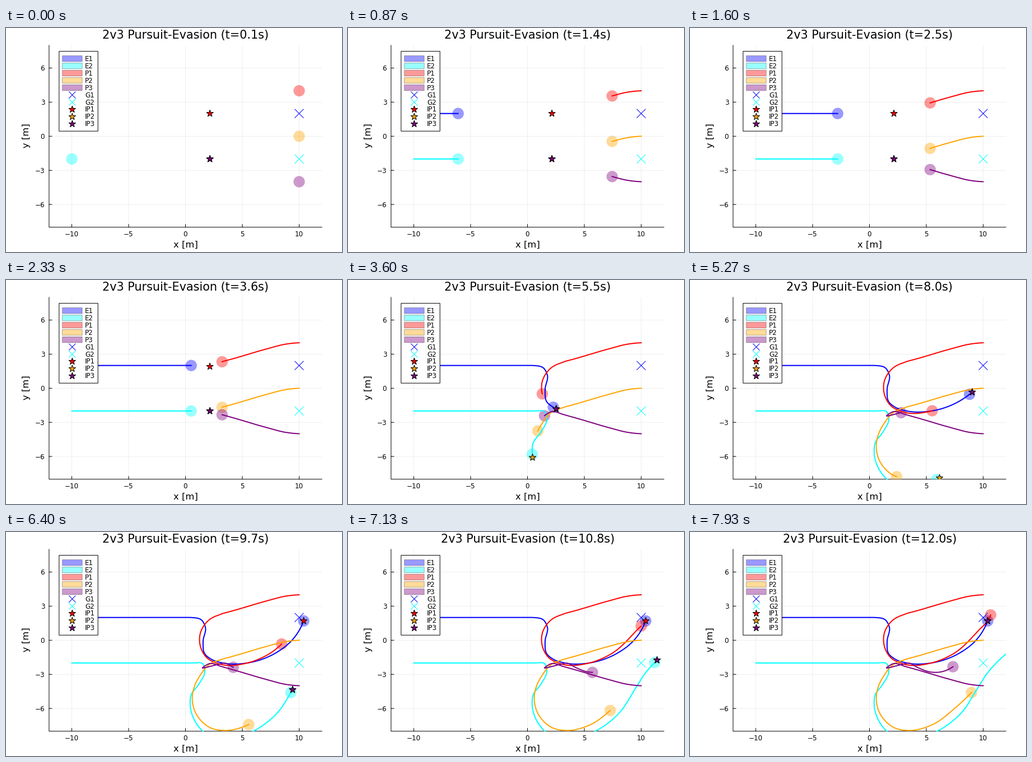
Animation, 600 px wide and 400 px high, one loop 8000 ms. Source, as a matplotlib script:

```python
import numpy as np
import matplotlib.pyplot as plt
from matplotlib.animation import FuncAnimation
from matplotlib.patches import Circle, Polygon, Rectangle

W, H, DPI = 600, 400, 100
STEPS, LOOP_MS = 120, 8000
TICKS = 2 * STEPS                  # two ticks per simulated 0.1 s
PX = 72 / DPI                      # points per pixel
UNIT, X0, Y0 = 20.3, 320.5, 193.3  # plot scale and origin in pixels
LEFT, RIGHT = X0 - 12 * UNIT, X0 + 12 * UNIT
TOP, BOTTOM = Y0 - 8 * UNIT, Y0 + 8 * UNIT
E_SPEED = 3 * UNIT
MEET = 4.15                        # time at which the first intercepts are due

plt.rcParams["font.family"] = "DejaVu Sans"
plt.rcParams["path.snap"] = False
fig = plt.figure(figsize=(W / DPI, H / DPI), dpi=DPI, facecolor="white")
ax = fig.add_axes([0, 0, 1, 1])
ax.set_xlim(0, W)
ax.set_ylim(H, 0)
ax.axis("off")
frame = Rectangle((LEFT, TOP), RIGHT - LEFT, BOTTOM - TOP, transform=ax.transData)


def sx(x):
    return X0 + UNIT * x


def sy(y):
    return Y0 - UNIT * y


def line(xs, ys, color="black", width=1.0, z=1, **kw):
    return ax.plot(xs, ys, color=color, lw=width * PX, zorder=z, **kw)[0]


def label(x, y, s, size, ha="center", z=1, **kw):
    return ax.text(x, y, s, fontsize=size * PX, ha=ha, va="baseline", zorder=z, **kw)


def cross(x, y, color, r, z):
    for d in (r, -r):
        line([x - r, x + r], [y - d, y + d], color, z=z, solid_capstyle="butt")


ANGLE = np.pi * np.arange(10) / 5
STAR = (np.where(np.arange(10) % 2, 2.5, 6.5) * [np.sin(ANGLE), -np.cos(ANGLE)]).T


def star(x, y, color, z):
    return ax.add_patch(Polygon(STAR + [x, y], fc=color, ec="black", lw=PX, zorder=z))


class Path:
    """Smooth curve through points; those with a third value fix the time."""

    def __init__(self, *pts):
        p = np.array([(sx(q[0]), sy(q[1])) for q in pts])
        s = np.r_[0, np.cumsum(np.hypot(*np.diff(p, axis=0).T))]
        m = np.gradient(p, s, axis=0, edge_order=2)
        u = np.union1d(np.linspace(0, s[-1], 900), s)
        k = np.clip(np.searchsorted(s, u, "right") - 1, 0, len(s) - 2)
        h = (s[k + 1] - s[k])[:, None]
        v = (u - s[k])[:, None] / h
        self.xy = ((1 + 2 * v) * (1 - v) ** 2 * p[k] + v * (1 - v) ** 2 * h * m[k]
                   + v * v * (3 - 2 * v) * p[k + 1] + v * v * (v - 1) * h * m[k + 1])
        arc = np.r_[0, np.cumsum(np.hypot(*np.diff(self.xy, axis=0).T))]
        fixed = [i for i, q in enumerate(pts) if len(q) == 3]
        self.t = np.interp(arc, np.interp(s[fixed], u, arc), [pts[i][2] for i in fixed])

    def at(self, t):
        return np.array([np.interp(t, self.t, c) for c in self.xy.T])

    def trail(self, t):
        return np.vstack([self.xy[self.t < t], self.at(t)])

    def ahead(self, t):
        """Predicted intercept point in front of the evader."""
        d = self.at(t + 0.05) - self.at(t - 0.05)
        n = np.hypot(*d)
        if n < 1e-6:
            return self.at(t)
        return self.at(t) + d / n * max(6, E_SPEED * (MEET - t))


def run(y):
    """Evader's straight run from the left."""
    return (-10, y, 0.1), (0, y), (0.5, y, 3.6)


def launch(y, side):
    """Pursuer's start from the right, bending down (1) or up (-1)."""
    return ((10, y, 0.1), (8.7, y - 0.14 * side), (7.46, y - 0.45 * side),
            (4.2, y - 1.4 * side), (3.22, y - 1.67 * side, 3.6))


e1 = Path(*run(2), (1.4, 1.79), (1.75, 1.15), (1.55, -0.1), (1.7, -1.2),
          (2.27, -1.67, 5.5), (3.28, -2), (5.44, -2), (7.85, -1.17),
          (9.38, 0.01), (10.4, 1.7, 9))
e2 = Path(*run(-2), (1.55, -2.1), (1.7, -2.7), (1.15, -3.9), (0.5, -4.8),
          (0.42, -5.8, 5.5), (1.5, -7.97), (3.65, -8.75), (5.9, -8.03, 8),
          (8.25, -6.19), (9.27, -4.6, 9.7), (10.4, -2.85), (13.8, 0, 11.9))
p1 = Path(*launch(4, 1), (2.04, 1.76), (1.3, 0.6), (1.29, -0.45), (1.85, -1.51),
          (3.18, -2.14), (5.44, -2), (7.36, -1.2), (9.68, 0.95), (10.55, 1.9),
          (10.66, 2.23, 11.4))
p2 = Path(*launch(0, 1), (2.1, -2.13), (1.25, -3.15), (0.91, -3.75, 5.5),
          (0.6, -4.95), (0.86, -6.33), (2.19, -7.7), (3.52, -7.94),
          (5.44, -7.47), (7.6, -5.9), (8.97, -4.6, 12))
p3 = Path(*launch(-4, -1), (2.1, -2.06), (1.5, -2.42, 5.5), (2.78, -2.15, 8),
          (3.5, -2.02), (4.2, -2.38, 9.7), (5.4, -2.8), (6.2, -2.8), (7.34, -2.33, 12))

AGENTS = [("E1", e1, "blue"), ("E2", e2, "cyan"), ("P1", p1, "red"),
          ("P2", p2, "orange"), ("P3", p3, "purple")]
GOALS = [("G1", 2, "blue"), ("G2", -2, "cyan")]
STARS = [("IP1", "red"), ("IP2", "orange"), ("IP3", "purple")]

# grid, axes and labels
for x in range(-10, 11, 5):
    line([sx(x)] * 2, [TOP, BOTTOM], "#e8e8e8", 0.7, 0)
    line([sx(x)] * 2, [BOTTOM, BOTTOM - 5])
    label(sx(x) - 0.3, 372, str(x).replace("-", "\u2212"), 11.9)
for y in range(-6, 7, 3):
    line([LEFT, RIGHT], [sy(y)] * 2, "#e8e8e8", 0.7, 0)
    line([LEFT, LEFT + 5], [sy(y)] * 2)
    label(69.2, sy(y) + 4.4, str(y).replace("-", "\u2212"), 11.9, "right")
line([LEFT, LEFT, RIGHT], [TOP, BOTTOM, BOTTOM])
label(320.6, 392, "x [m]", 16.35)
ax.text(43.7, 192.5, "y [m]", fontsize=16.35 * PX, rotation=90, ha="right", va="center")
title = label(320.8, 18.6, "", 20.8)

# legend
ax.add_patch(Rectangle((94.8, 41.6), 69.4, 142.6, fc="white", ec="black", lw=PX, zorder=8))
names = [a[0] for a in AGENTS] + [g[0] for g in GOALS] + [s[0] for s in STARS]
rows = 54.7 + 12.97 * np.arange(len(names))
for name, y in zip(names, rows):
    label(141, y + 4, name, 11.9, "left", 9)
for (_, _, color), y in zip(AGENTS, rows):
    box = (100.6, y - 5.2), 35.5, 10.4
    ax.add_patch(Rectangle(*box, fc=color, alpha=0.4, lw=0, zorder=9))
    ax.add_patch(Rectangle(*box, fc="none", ec="black", alpha=0.5, lw=0.6 * PX, zorder=9))
for (_, _, color), y in zip(GOALS, rows[5:]):
    cross(118.3, y, color, 6, 9)
for (_, color), y in zip(STARS, rows[7:]):
    star(118.3, y, color, 9)

# moving parts
for _, y, color in GOALS:
    cross(sx(10), sy(y), color, 8, 4)
discs = [ax.add_patch(Circle((0, 0), UNIT / 2, fc=c, alpha=0.4, lw=0, zorder=2))
         for _, _, c in AGENTS]
trails = [line([], [], c, 2, 3) for _, _, c in AGENTS]
stars = [star(0, 0, c, 5) for _, c in STARS]
for art in discs + trails + stars:
    art.set_clip_path(frame)


def p3_target(t):
    return e1 if 5.2 <= t < 9.05 or t >= 11 else e2


def update(tick):
    step = min((tick + 1) // 2, STEPS - 1)
    t = (step + 1) / 10
    title.set_text(f"2v3 Pursuit-Evasion (t={t:.1f}s)")
    for (_, path, _), disc, trail in zip(AGENTS, discs, trails):
        disc.center = path.at(t)
        trail.set_data(*path.trail(t).T)
    for mark, evader in zip(stars, (e1, e2, p3_target(t))):
        mark.set_xy(STAR + evader.ahead(t))
    return [title, *discs, *trails, *stars]


anim = FuncAnimation(fig, update, frames=TICKS, interval=LOOP_MS / TICKS,
                     init_func=lambda: update(0), repeat=True, repeat_delay=0)
plt.show()
```
